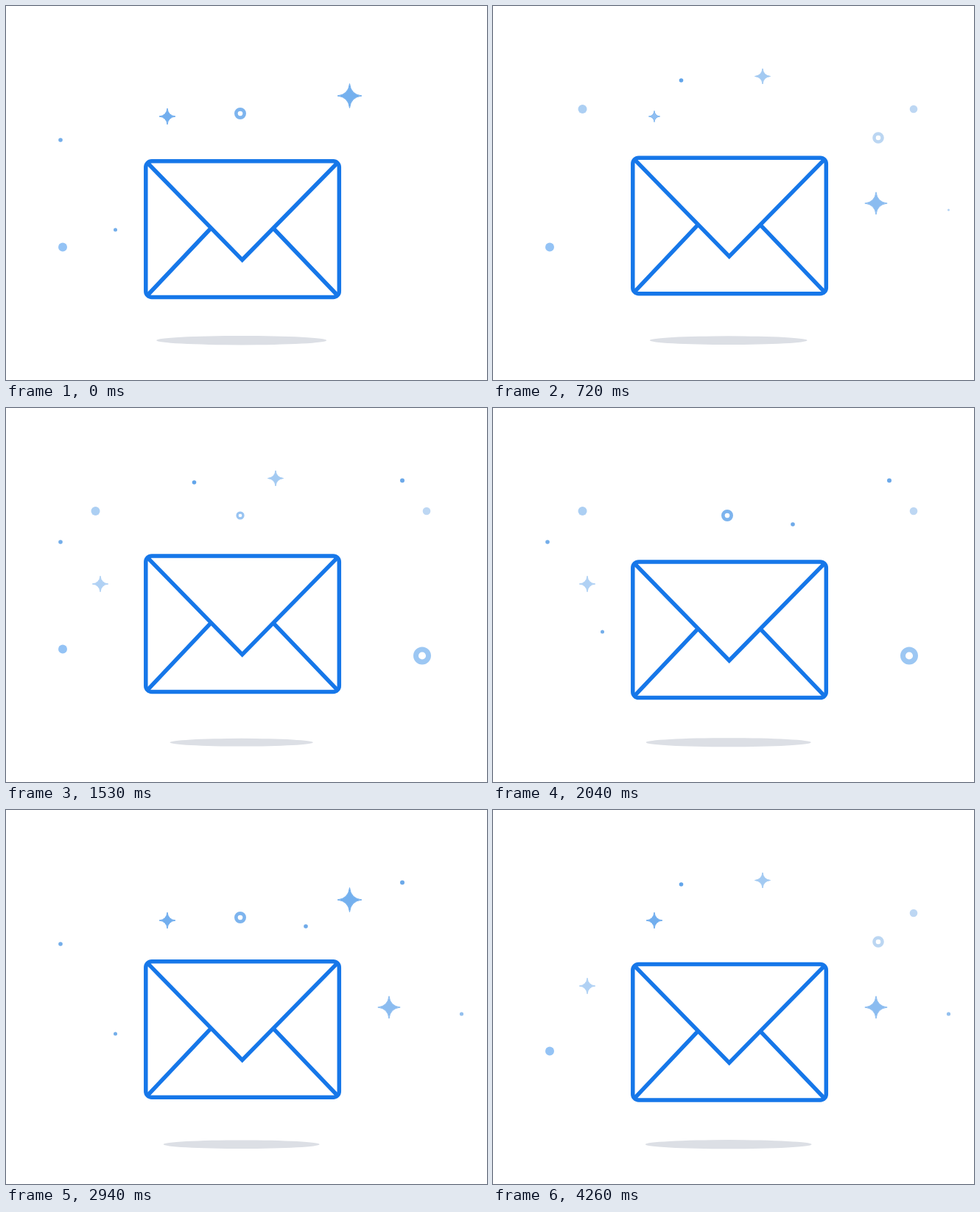
These frames come from a looping animation (653x508 px, 4.29 s). An HTML page with a canvas:

```html
<!DOCTYPE html>
<html lang="en">
<head>
<meta charset="utf-8">
<title>Floating envelope</title>
<style>
  html, body { margin: 0; width: 100%; height: 100%; overflow: hidden; background: #fff; }
  canvas { display: block; }
</style>
</head>
<body>
<canvas id="stage" width="653" height="508"></canvas>
<script>
const LOOP = 4290, STEP = 30, FADE = 300;
const START = -FADE, END = LOOP + FADE;
const ctx = document.getElementById('stage').getContext('2d');

// kind, x, y, radius, colour, then pairs of appear and vanish times
const sparkles = [
  ['dot', 74, 182, 2.8, '#74aeea', START, 500, 1200, 3300],
  ['dot', 77, 327.5, 6, '#94c3f5', START, 1850, 3300, END],
  ['dot', 148.5, 304, 2.5, '#74aeea', START, 500, 1700, 3300],
  ['star', 219, 150, 11, '#72aeee', START, 930, 2450, END],
  ['ring', 318, 146, 8, '#7db4ee', START, 500, 1320, 3300],
  ['star', 466.5, 122, 16.5, '#74b0ee', START, 500, 2450, 3300],
  ['dot', 121.5, 140, 6, '#accff3', 350, 2500],
  ['dot', 255.5, 101, 2.8, '#62a5ea', 350, 1950, 3850, END],
  ['star', 366, 95.5, 10.5, '#a3caf2', 200, 1950, 3060, END],
  ['dot', 571, 140, 5.3, '#bdd7f3', 200, 2500, 3850, END],
  ['ring', 523, 179, 7.8, '#bbd6f2', 350, 1250, 3300, END],
  ['star', 520, 268, 15.2, '#8bbcf0', 350, 1400, 2450, END],
  ['dot', 618.5, 277, 2.6, '#94c0ee', 545, 1400, 2350, END],
  ['dot', 538, 98.5, 3, '#6ca9e9', 1150, 3300],
  ['ring', 565, 336.5, 12, '#9cc7f3', 1150, 2500],
  ['star', 128, 239, 10.8, '#b0d1f4', 1150, 2500, 3850, END],
  ['dot', 407, 158, 2.8, '#6faae9', 1700, 3300]
];

const shapes = {
  dot(r) {
    ctx.arc(0, 0, r, 0, 7);
    ctx.fill();
  },
  ring(r) {
    ctx.lineWidth = r * 0.58;
    ctx.arc(0, 0, r * 0.71, 0, 7);
    ctx.stroke();
  },
  star(r) {
    const c = r * 0.1;
    ctx.moveTo(0, -r);
    ctx.quadraticCurveTo(c, -c, r, 0);
    ctx.quadraticCurveTo(c, c, 0, r);
    ctx.quadraticCurveTo(-c, c, -r, 0);
    ctx.quadraticCurveTo(-c, -c, 0, -r);
    ctx.fill();
    ctx.lineWidth = 1;
    ctx.stroke();
  }
};

function drawSparkle([kind, x, y, r, colour, ...times], t) {
  let size = 0;
  for (let i = 0; i < times.length; i += 2) {
    size = Math.max(size, Math.min(1, (t - times[i]) / FADE, (times[i + 1] - t) / FADE));
  }
  if (!size) return;
  ctx.save();
  ctx.translate(x, y);
  ctx.globalAlpha = 0.3 + 0.7 * size;
  ctx.fillStyle = ctx.strokeStyle = colour;
  ctx.beginPath();
  shapes[kind](r * size);
  ctx.restore();
}

// Height above the pose at time zero
function lift(t) {
  const wave = u => Math.cos((u - 200) / 2190 * 2 * Math.PI);
  return 6.1 * (wave(0) - wave(t));
}

function drawShadow(h) {
  ctx.fillStyle = '#dcdfe5';
  ctx.beginPath();
  ctx.ellipse(319.7, 454.2, 115.5 - 1.85 * h, 6.2 - 0.08 * h, 0, 0, 7);
  ctx.fill();
}

function drawEnvelope(h) {
  ctx.save();
  ctx.translate(0, -h);
  ctx.strokeStyle = '#1677e9';
  ctx.lineWidth = 5.5;
  ctx.fillStyle = '#fff';
  ctx.beginPath();
  ctx.roundRect(189.8, 210.8, 262.5, 184.6, 8);
  ctx.fill();
  ctx.stroke();
  ctx.beginPath();
  ctx.moveTo(192, 213);
  ctx.lineTo(320.7, 344.8);
  ctx.lineTo(450, 213);
  ctx.moveTo(192, 393);
  ctx.lineTo(278, 302);
  ctx.moveTo(450, 393);
  ctx.lineTo(363, 302);
  ctx.stroke();
  ctx.restore();
}

function draw() {
  const t = Math.floor(performance.now() % LOOP / STEP) * STEP;
  const h = lift(t);
  ctx.clearRect(0, 0, 653, 508);
  sparkles.forEach(s => drawSparkle(s, t));
  drawShadow(h);
  drawEnvelope(h);
  requestAnimationFrame(draw);
}
draw();
</script>
</body>
</html>
```
